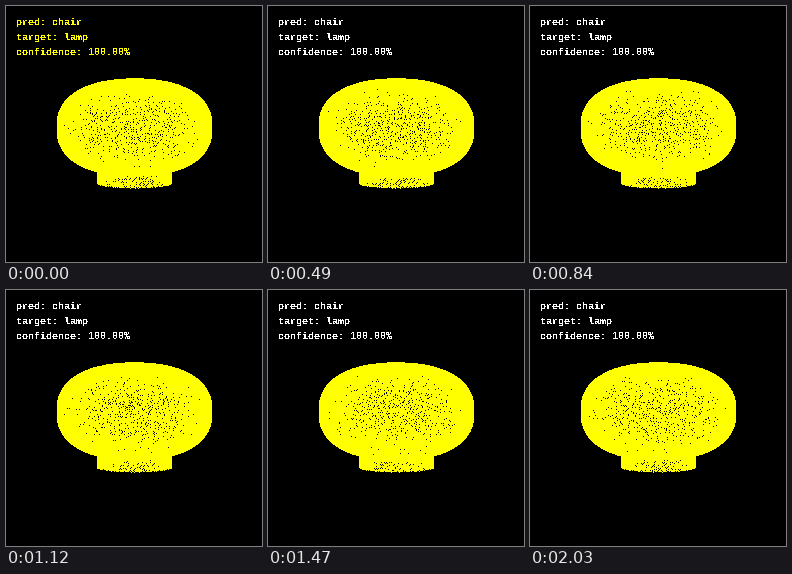
Write a matplotlib script that moves like this. It is 256 px wide and 256 px high and loops after 2100 ms.

```python
import numpy as np
import matplotlib.pyplot as plt
from matplotlib.animation import FuncAnimation

SIZE, DPI = 256, 100
FRAMES, INTERVAL = 30, 70
TILT = np.radians(8)
CENTER = (128, 122)
YELLOW = "#ffff00"
LINES = ("pred: chair", "target: lamp", "confidence: 100.00%")

plt.rcParams["text.hinting"] = "native"
plt.rcParams["text.hinting_factor"] = 1

rng = np.random.default_rng(4)


def revolve(radius, height, density):
    """Spread points evenly over the surface swept by a profile."""
    step = np.hypot(np.diff(radius), np.diff(height))
    ring = np.pi * (radius[1:] + radius[:-1]) * step
    area = np.concatenate(([0], np.cumsum(ring)))
    n = int(area[-1] * density)
    i = np.arange(n)
    u = (i * 0.7548776662 + rng.normal(0, 0.0015, n)) % 1 * area[-1]
    angle = i * 0.5698402910 * 2 * np.pi + rng.normal(0, 0.006, n)
    return np.interp(u, area, radius), angle, np.interp(u, area, height)


def body_profile():
    power = 2 / 2.4
    t = np.linspace(np.pi / 2, -np.pi / 2, 1200)
    r = 77.5 * np.abs(np.cos(t)) ** power
    h = 47 * np.sign(t) * np.abs(np.sin(t)) ** power
    keep = (h > 0) | (r > 37.5)
    return r[keep], h[keep]


body = revolve(*body_profile(), 0.8)
base = revolve(np.array([37.5, 37.5]), np.array([-43.5, -56.0]), 1.5)
radius, angle, height = (np.concatenate(p) for p in zip(body, base))


def project(turn):
    a = angle + turn
    x = CENTER[0] + radius * np.cos(a)
    y = CENTER[1] - height * np.cos(TILT) + radius * np.sin(a) * np.sin(TILT)
    return x, y


fig = plt.figure(figsize=(SIZE / DPI, SIZE / DPI), dpi=DPI, facecolor="black")
ax = fig.add_axes([0, 0, 1, 1])
ax.set(xlim=(0, SIZE), ylim=(SIZE, 0))
ax.axis("off")

cloud, = ax.plot([], [], ",", color=YELLOW, antialiased=False)
labels = [
    ax.text(10, 19 + 15 * k, line, family="Liberation Mono", weight="bold",
            size=10 * 72 / DPI, va="baseline", antialiased=False)
    for k, line in enumerate(LINES)
]


def draw(frame):
    cloud.set_data(*project(2 * np.pi * frame / FRAMES))
    for label in labels:
        label.set_color(YELLOW if frame == 0 else "white")
    return [cloud, *labels]


anim = FuncAnimation(fig, draw, frames=FRAMES, interval=INTERVAL,
                     repeat=True, repeat_delay=0)
plt.show()
```
